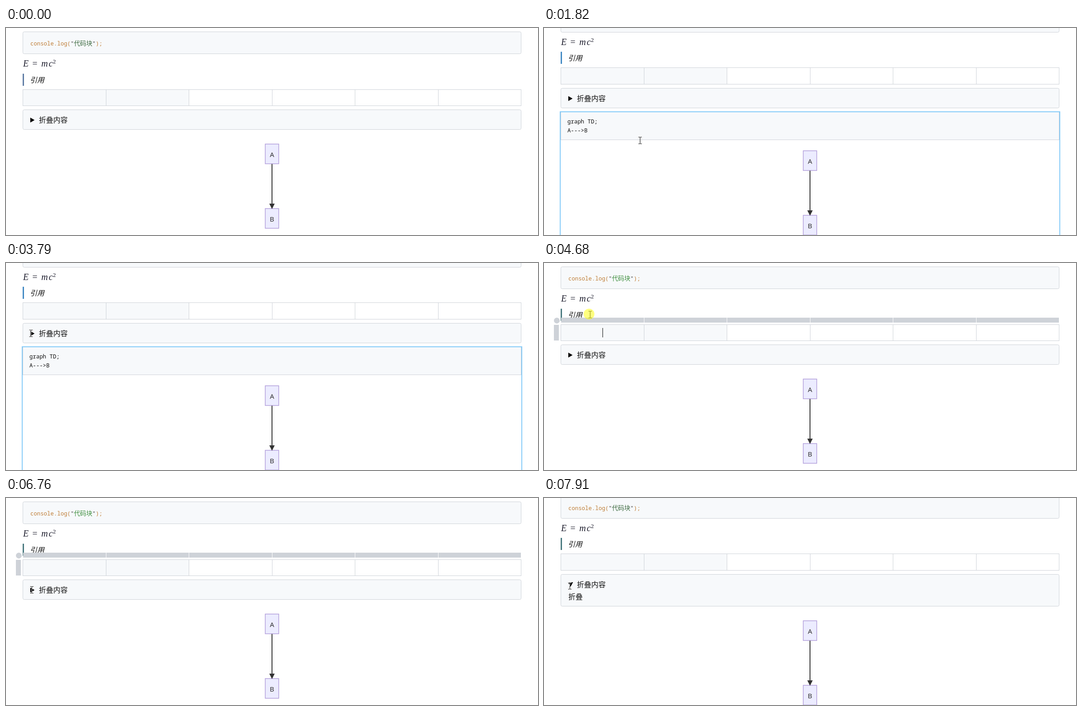
Animation of 1182 by 462 pixels, one loop 8000 ms. Source, as an HTML page:

```html
<!DOCTYPE html>
<html lang="zh">
<head>
<meta charset="utf-8">
<style>
  html, body { margin: 0; width: 100%; height: 100%; overflow: hidden; background: #fff; }
  svg { display: block; }
  text { white-space: pre; fill: #111; }
  .panel { fill: #f7f9fb; stroke: #ced2d8; }
  .line { fill: none; stroke: #ced2d8; }
  .handle { fill: #ced2d8; }
  .mono { font: 12.45px "Noto Sans Mono", monospace; }
  .cjk { font: 16px "Noto Sans CJK SC", "Noto Sans CJK", sans-serif; }
  .quote { font-style: italic; }
  .code { fill: #bf7d35; }
  .str { font: 13.6px "Noto Sans CJK SC", "Noto Sans CJK", sans-serif; }
  .math { font: italic 20px "Liberation Serif", serif; fill: #1c1c2c; }
  .up { font-style: normal; }
  .sup { font-style: normal; font-size: 13.5px; }
  .node { fill: #ececff; stroke: #b3a0dc; stroke-width: 1.5; }
  .label { font: 15px "Noto Sans", sans-serif; fill: #333; text-anchor: middle; }
  #cursor { mix-blend-mode: difference; }
</style>
</head>
<body>
<svg id="stage" width="1182" height="462" viewBox="0 0 1182 462"></svg>
<script>
const LOOP = 8000;
const STEP = 68; // time between two cursor positions
const columnX = i => 37 + Math.round(184.5 * i);
const repeat = (n, draw) => Array.from({ length: n }, (_, i) => draw(i)).join('');

const panel = (y, h, rx = 3) =>
  `<rect class="panel" x="37.5" y="${y + .5}" width="1107" height="${h}" rx="${rx}"/>`;
const text = (cls, x, y, s) => `<text class="${cls}" x="${x}" y="${y}">${s}</text>`;

function codeBlock(dy, color) {
  const mark = '<tspan fill="#444">"</tspan>';
  const string = `<tspan class="str" fill="${color}">代码块</tspan>`;
  return panel(8 + dy, 49) + text('mono code', 54, 39 + dy, `console.log(${mark}${string}${mark});`);
}

const formula = dy =>
  text('math', 38, 86 + dy, 'E') + text('math up', 58.5, 86 + dy, '=') +
  text('math', 78.5, 86 + dy, 'm') + text('math', 95, 86 + dy, 'c') +
  text('math sup', 104, 79 + dy, '2');

const quote = (dy, color) =>
  `<rect x="37" y="${102 + dy}" width="3" height="27" fill="${color}"/>` +
  text('cjk quote', 53, 122 + dy, '引用');

const table = (top, bottom) =>
  `<rect x="37" y="${top}" width="370" height="${bottom - top}" fill="#f7f9fb"/>
   <path class="line" d="M37 ${top + .5}H1145M37 ${bottom + .5}H1145
     ${repeat(7, i => `M${columnX(i) + .5} ${top}V${bottom + 1}`)}"/>`;

const tableHandles = () =>
  '<rect x="38" y="122" width="1106" height="11" fill="#fff"/>' +
  repeat(6, i => `<rect class="handle" x="${columnX(i) + 1}" y="122"
    width="${columnX(i + 1) - columnX(i) - 1}" height="11"/>`) +
  `<circle class="handle" cx="28.5" cy="128.5" r="6.5"/>
   <rect class="handle" x="22" y="138" width="11" height="35"/>`;

function details(dy, open) {
  const y = 182 + dy;
  const marker = open ? `M53.5 ${y + 18}h11l-5.5 10Z` : `M54 ${y + 18}v11l9.5 -5.5Z`;
  return panel(y, open ? 71 : 44) + `<path d="${marker}"/>` +
    text('cjk', 73, y + 29, '折叠内容') + (open ? text('cjk', 54, y + 56, '折叠') : '');
}

const node = (y, name) =>
  `<rect class="node" x="576" y="${y}" width="30" height="44"/>` + text('label', 591, y + 29, name);
const diagram = dy => node(259 + dy, 'A') + node(403 + dy, 'B') +
  `<path d="M591 ${303.5 + dy}v90" stroke="#333" stroke-width="2"/>
   <path d="M585 ${392 + dy}h12l-6 12Z" fill="#333"/>`;

const editor = () => panel(187, 62, 0) +
  text('mono', 52, 213, 'graph TD;') + text('mono', 52, 233, 'A---&gt;B') +
  '<rect x="36" y="187" width="1110" height="300" fill="none" stroke="#85cbf8" stroke-width="2"/>';

// A scrolled page rounds the quote and the table's top edge one pixel higher.
function page({ scroll = 0, string = '#3d6b41', bar = '#4a7a80', handles, open, edit }) {
  const upper = scroll ? -scroll - 1 : 0;
  return codeBlock(-scroll, string) + formula(-scroll) + quote(upper, bar) +
    table(137 + upper, 173 - scroll) + (handles ? tableHandles() : '') +
    details(-scroll, open) + (edit ? editor() : '') + diagram(scroll ? 15 : 0);
}

const scenes = [
  { from: 0, bar: '#607da6' },
  { from: 1220, scroll: 48, bar: '#438bc4', edit: true },
  { from: 4680, string: '#3f8f3f', handles: true },
  { from: 6900, scroll: 12, open: true },
];

// Each stroke leads from the previous resting point to (x, y).
const strokes = [
  { from: 330, steps: 7, x: 692, y: 340 },
  { from: 1410, steps: 7, x: 213, y: 251 },
  { from: 1890, steps: 4, x: 99, y: 235 },
  { from: 2300, steps: 9, x: 172, y: 170 },
  { from: 3440, steps: 6, x: 55, y: 157 },
  { from: 4190, steps: 5, x: 102, y: 115 },
  { from: 4740, steps: 9, x: 55, y: 212 },
  { from: 6020, steps: 9, x: 57, y: 205 },
  { from: 7650, steps: 4, x: 57, y: 196 },
];
const clicks = [1150, 4680, 5420, 5610, 6830];

function cursorAt(t) {
  let x = 1122, y = 466;
  for (const s of strokes) {
    if (t < s.from) break;
    const p = Math.min(1, (Math.floor((t - s.from) / STEP) + 1) / s.steps);
    x += (s.x - x) * p;
    y += (s.y - y) * p;
  }
  return `translate(${Math.round(x)} ${Math.round(y)})`;
}

const stage = document.getElementById('stage');
stage.innerHTML = '<rect width="1182" height="462" fill="#fff"/>' +
  scenes.map(look => `<g class="scene">${page(look)}</g>`).join('') +
  `<rect id="caret" x="130" y="145" width="1" height="21"/>
   <g id="pointer">
     <path id="cursor" fill="none" stroke="#fff" d="M-3 -7.5H0M1 -7.5H4M.5 -7V7M-3 7.5H0M1 7.5H4"/>
     <circle id="glow" cx="-2" cy="-1" r="12" fill="#ff0" opacity=".5"/>
   </g>`;

const [caret, pointer, cursor, glow] =
  ['caret', 'pointer', 'cursor', 'glow'].map(id => document.getElementById(id));
const layers = [...document.querySelectorAll('.scene')];
const show = (el, on) => { el.style.display = on ? '' : 'none'; };

function draw(t) {
  const current = scenes.findLastIndex(s => t >= s.from);
  layers.forEach((layer, i) => show(layer, i === current));
  show(caret, t >= 4680 && t < 5210);
  show(pointer, t >= strokes[0].from);
  show(glow, clicks.some(c => t >= c && t < c + 70));
  pointer.setAttribute('transform', cursorAt(t));
}

const start = performance.now();
function tick() {
  draw((performance.now() - start) % LOOP);
  requestAnimationFrame(tick);
}
tick();
</script>
</body>
</html>
```
